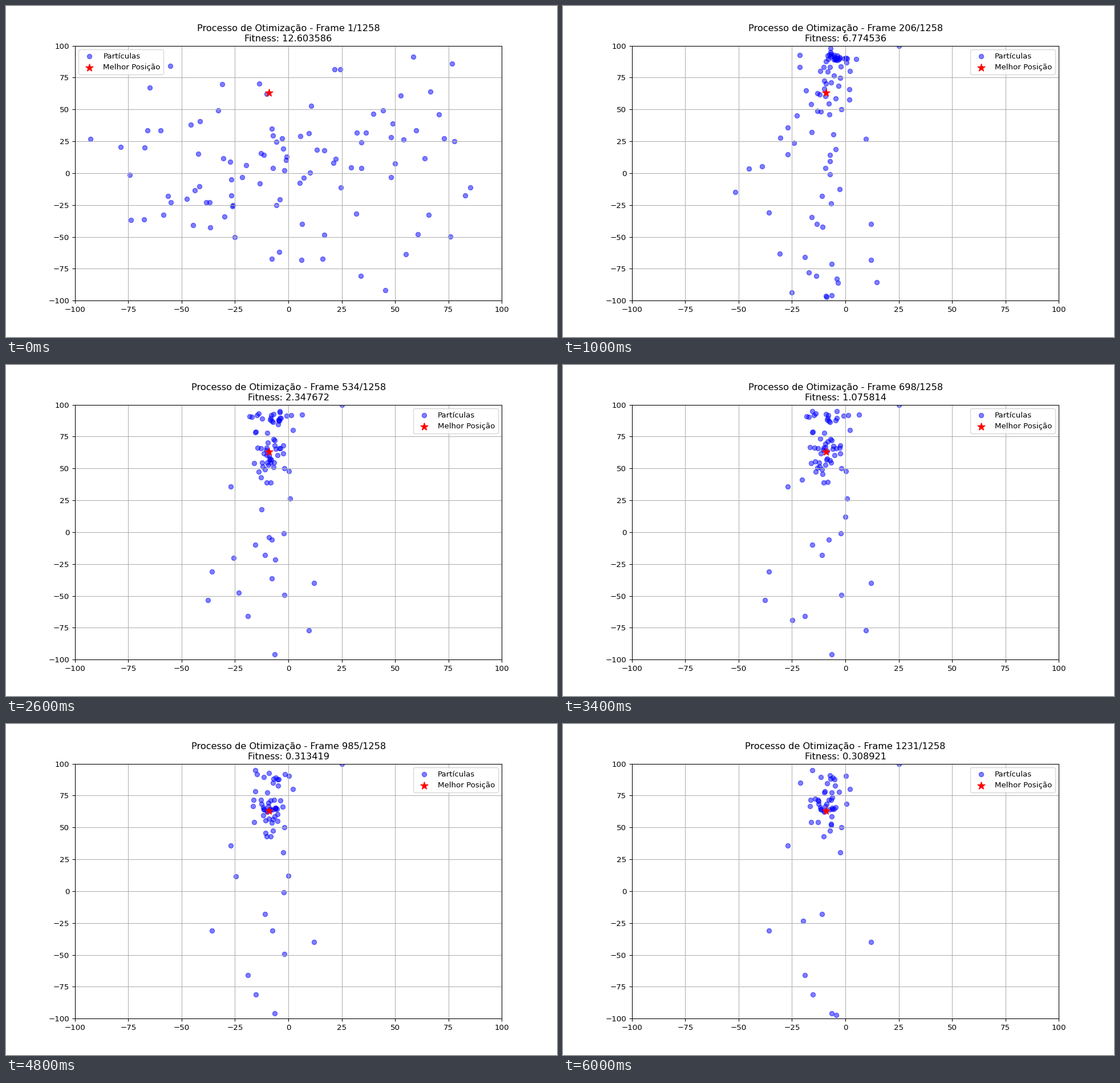
A matplotlib script that plays this animation: 966 px wide and 580 px high, repeating every 6.2 s.

```python
import numpy as np
import matplotlib.pyplot as plt
from matplotlib.animation import FuncAnimation

WIDTH, HEIGHT, DPI = 966, 580, 96.6
STEPS, STEP_MS = 31, 200
STRIDE, TOTAL = 41, 1258
SWARM, FADE = 100, 1.45
BEST, RIDGE = (-9, 63), (-6.3, 90)

# Far-off particles that settle early and stay
STRAYS = [(25.2, 100), (-27, 36), (-35.7, -31), (12, -40), (-19, -66),
          (-6.3, -96), (-11, -18), (2, 80), (-16, 54), (-1.9, 50)]

# Best fitness at some generations
FIT = [(1, 12.603586), (124, 8.301458), (329, 4.774867), (534, 2.347672),
       (698, 1.075814), (870, 0.33), (985, 0.313419), (1231, 0.308921)]
FIT_GEN, FIT_VALUE = zip(*FIT)

rng = np.random.default_rng(12)


def fitness(gen):
    return np.interp(gen, FIT_GEN, np.sqrt(FIT_VALUE)) ** 2


def pick_spot(step):
    """Early jumps roam or hit the upper ridge, later ones close in on BEST."""
    early = np.exp(-step / 9)
    roam = 0.08 + 0.42 * early
    ridge = 0.10 + 0.35 * early
    u = rng.random()
    if u < roam:
        return rng.laplace(BEST[0], 4 + 12 * early), rng.uniform(-100, 50)
    if u < roam + ridge:
        return rng.laplace(RIDGE, (3.5, 2.5))
    return rng.normal(BEST, (4, 11))


def make_path(k):
    """One particle: rest, jump, rest longer, and so on."""
    path = np.empty((STEPS, 2))
    path[:] = rng.triangular(-100, (-5, 15), 100)
    step = rng.choice([1, 2, 3], p=[0.6, 0.25, 0.15])
    if k < len(STRAYS):
        path[step:] = STRAYS[k]
        return path
    while step < STEPS:
        path[step:] = pick_spot(step)
        step += rng.integers(2, 4 + step)
    return path


paths = np.array([make_path(k) for k in range(SWARM)])

# The small margin keeps rounding from losing a pixel
fig, ax = plt.subplots(figsize=((WIDTH + 0.01) / DPI, (HEIGHT + 0.01) / DPI), dpi=DPI)
ax.set(xlim=(-100, 100), ylim=(-100, 100))
ax.grid(True)
dots = ax.scatter([], [], c="blue", alpha=0.5, label="Partículas")
ax.scatter(*BEST, c="red", marker="*", s=100, label="Melhor Posição")
legend = ax.legend(loc="upper left")
title = ax.set_title("")


def update(step):
    gen = 1 + STRIDE * step
    visible = round(SWARM - FADE * step)
    dots.set_offsets(paths[:visible, step])
    legend.set_loc("upper right" if step else "upper left")
    title.set_text(f"Processo de Otimização - Frame {gen}/{TOTAL}\n"
                   f"Fitness: {fitness(gen):.6f}")
    return dots, legend, title


anim = FuncAnimation(fig, update, frames=STEPS, interval=STEP_MS,
                     repeat=True, repeat_delay=0, blit=False)
plt.show()
```
